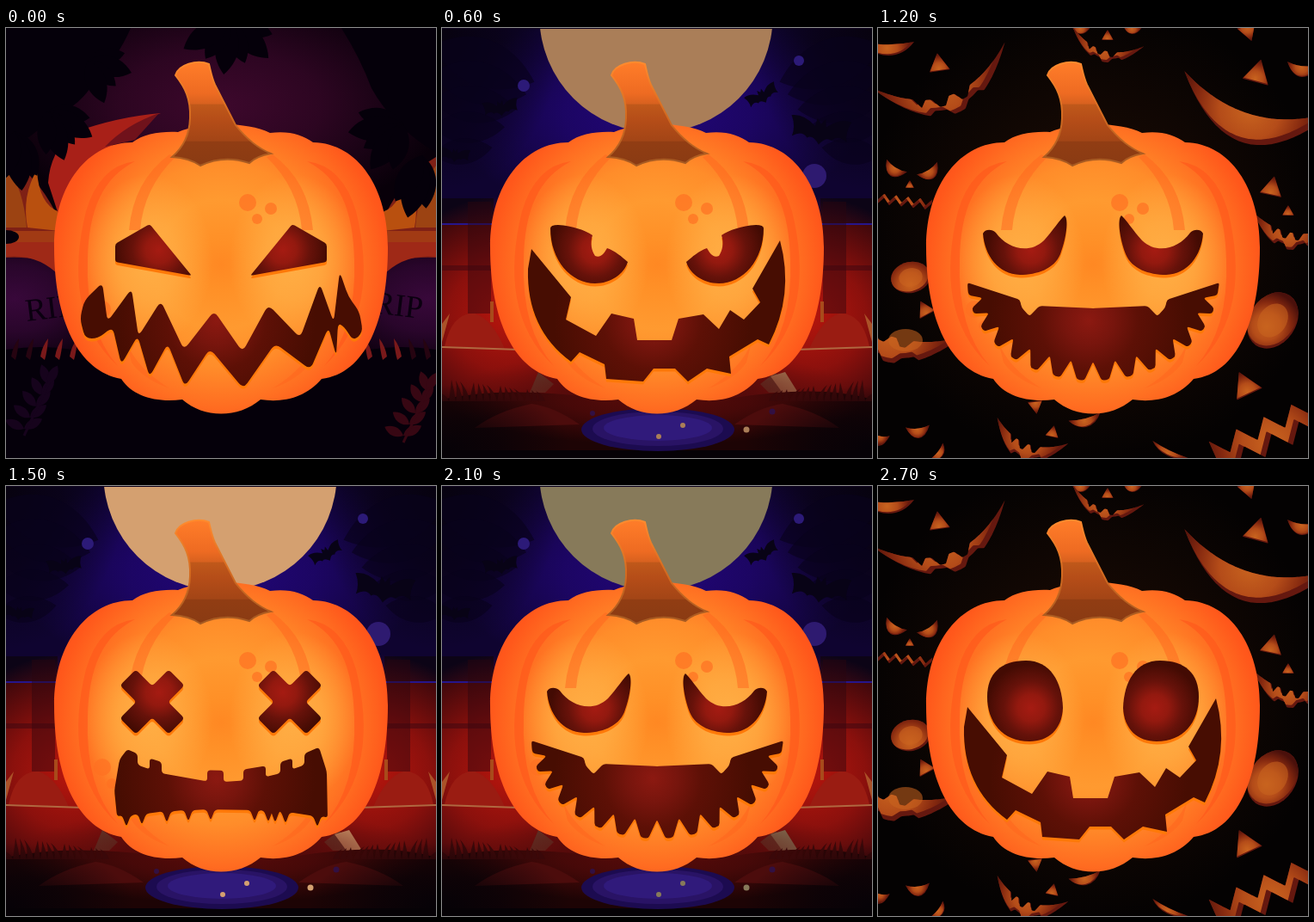
Recreate the animation shown at these times as an HTML page with a canvas. Size 500x500 px, loop 3000 ms.

```html
<!DOCTYPE html>
<html lang="en">
<head>
<meta charset="utf-8">
<title>Pumpkin faces</title>
<style>
html, body { margin: 0; width: 100%; height: 100%; overflow: hidden; background: #000; }
canvas { display: block; width: 100vw; height: 100vh; }
</style>
</head>
<body>
<canvas id="stage" width="500" height="500"></canvas>
<script>
const c = document.getElementById('stage').getContext('2d');
const STEP = 300;

const fill = (path, color) => { c.fillStyle = color; c.fill(path); };
const shape = (d, color) => fill(new Path2D(d), color);
const rect = (x, y, w, h, color) => { c.fillStyle = color; c.fillRect(x, y, w, h); };

function line(d, color, w) {
  c.strokeStyle = color;
  c.lineWidth = w;
  c.stroke(new Path2D(d));
}

function oval(x, y, rx, ry, color) {
  c.beginPath();
  c.ellipse(x, y, rx, ry, 0, 0, 7);
  c.fillStyle = color;
  c.fill();
}
const dot = (x, y, r, color) => oval(x, y, r, r, color);

function ramp(g, stops) {
  for (const [at, color] of stops) g.addColorStop(at, color);
  return g;
}
const radial = (x, y, r, ...stops) => ramp(c.createRadialGradient(x, y, 0, x, y, r), stops);
const linear = (y0, y1, ...stops) => ramp(c.createLinearGradient(0, y0, 0, y1), stops);

function at(x, y, turn, draw) {
  c.save();
  c.translate(x, y);
  c.rotate(turn);
  draw();
  c.restore();
}

function glow(x, y, rx, ry, color) {
  at(x, y, 0, () => {
    c.scale(rx, ry);
    dot(0, 0, 1, radial(0, 0, 1, [0, color], [.45, color + 'b0'], [1, color + '00']));
  });
}

function mirror(draw) {
  draw();
  c.save();
  c.translate(500, 0);
  c.scale(-1, 1);
  draw();
  c.restore();
}

// Closed polygon with softened corners
function poly(pts, soft = 2) {
  const path = new Path2D();
  const toward = ([x, y], [u, v]) => {
    const len = Math.hypot(u - x, v - y) || 1, k = Math.min(soft / len, .5);
    return [x + (u - x) * k, y + (v - y) * k];
  };
  pts.forEach((p, i) => {
    const a = toward(p, pts[(i || pts.length) - 1]), b = toward(p, pts[(i + 1) % pts.length]);
    i ? path.lineTo(...a) : path.moveTo(...a);
    path.quadraticCurveTo(...p, ...b);
  });
  path.closePath();
  return path;
}

// Height of a smiling curve whose lowest point is y
const smile = (x, y, bend) => y - bend * (x - 250) ** 2;

function zigzagMouth() {
  const top = [118, 146, 154, 180, 207, 242, 275, 305, 342, 365, 381, 388];
  const bottom = [386, 384, 375, 354, 313, 276, 237, 208, 188, 167, 153, 134, 124];
  return poly([
    [86, 338], [91, 317], [112, 296],
    ...top.map((x, i) => [x, i % 2 ? smile(x, 329, .0024) : smile(x, 378, .0021)]),
    [398, 312], [411, 330], [415, 354], [404, 364], [393, 347],
    ...bottom.map((x, i) => [x, i % 2 ? smile(x, 421, .0022) : smile(x, 373, .0016)]),
    [107, 361], [92, 361]
  ], 8);
}

function deadMouth() {
  const steps = [141, 153, 167, 181, 234, 253, 276, 302, 319, 333, 347, 364];
  const drips = [362, 325, 313, 305, 289, 238, 212, 187, 158, 140];
  const pts = [];
  steps.slice(1).forEach((x, i) => {
    for (const edge of [steps[i], x]) pts.push([edge, smile(edge, 331, .0021) + i % 2 * 13]);
  });
  pts.push([373, 332], [374, 386]);
  for (const x of drips) {
    const y = smile(x, 376, -.0006);
    pts.push([x + 5, y], [x, y + 13], [x - 5, y]);
  }
  return poly([...pts, [129, 384], [126, 354], [132, 318]], 4);
}

function sawMouth() {
  const half = [[104, 296], [165, 316], [167, 325], [176, 335], [188, 323]];
  const pts = [...half, [250, 326], ...half.map(([x, y]) => [501 - x, y]).reverse()];
  const add = (a, rx, ry) => pts.push([250 + rx * Math.cos(a), 296 + ry * Math.sin(a)]);
  const n = 16, gap = Math.PI / n;
  for (let i = 0; i < n; i++) {
    const a = (i + .5) * gap;
    add(a - gap * .15, 146, 114);
    add(a + gap * .15, 146, 114);
    if (i < n - 1) add(a + gap * .5, 131, 92);
  }
  return poly(pts, 3);
}

function crossEye() {
  const pts = [];
  for (let i = 0; i < 4; i++) {
    const a = Math.PI * (i / 2 + .25), cos = Math.cos(a), sin = Math.sin(a);
    for (const [u, v] of [[40, -13], [40, 13], [13, 13]]) pts.push([170 + u * cos - v * sin, 251 + u * sin + v * cos]);
  }
  return poly(pts, 4);
}

const EYES = {
  wedge: poly([[127, 251], [167, 228], [216, 288], [127, 272]], 3),
  sly: new Path2D('M126 233Q126 229 135 229C152 230 166 235 175 241C172 250 174 259 178 265C185 268 189 261 192 256C201 259 209 266 216 272C212 286 196 297 178 297C150 297 126 270 126 233Z'),
  round: new Path2D('M127 245C127 218 143 203 172 203C200 203 214 227 215 258C214 283 198 297 176 297C145 297 127 275 127 245Z'),
  cross: crossEye(),
  droop: new Path2D('M122 239C124 234 132 233 137 238C150 256 175 264 193 247C203 236 212 222 217 218C222 222 219 245 212 263C205 280 185 287 165 287C140 286 124 265 122 239Z')
};

const MOUTHS = {
  zigzag: zigzagMouth(),
  jagged: new Path2D('M104 257L150 313 144 339 179 358 197 332 223 338 227 363H267L275 338 304 333 322 350 335 328 351 339 370 319 361 303 393 247Q410 310 380 368L367 362 334 382 336 402 308 396 286 411 271 396H246L234 411 191 408 189 391 160 377 150 388Q98 350 100 280Z'),
  dead: deadMouth(),
  saw: sawMouth(),
  friendly: new Path2D('M114 303C140 318 165 328 190 330C188 340 190 349 198 349C208 349 214 342 215 333Q250 334 285 331C287 341 291 347 299 347C308 347 311 338 309 326C335 322 365 313 385 301C388 345 355 395 267 405C267 390 262 380 250 380C239 380 234 390 234 403C165 398 115 350 114 303Z')
};

function leaf(x, y, len, turn, color) {
  at(x, y, turn, () =>
    shape(`M0 0C${len * .3} ${-len * .32} ${len * .7} ${-len * .28} ${len} 0C${len * .7} ${len * .28} ${len * .3} ${len * .3} 0 0Z`, color));
}

function fan(x, y, n, from, to, len, color) {
  for (let i = 0; i < n; i++) leaf(x, y, len * (1 + i % 2 * .2), from + (to - from) * i / (n - 1), color);
}

function bush(x, y, color) {
  for (let i = 0; i < 5; i++) {
    const px = x + i * 7 - 14, py = y - i * 13 + 30;
    leaf(px, py, 24, -2.7 + i * .2, color);
    leaf(px, py, 24, -.5 - i * .15, color);
  }
  line(`M${x - 14} ${y + 38}L${x + 16} ${y - 26}`, color, 3);
}

function graveyard() {
  const ink = '#05000a';
  rect(0, 0, 500, 500, '#080009');
  glow(250, 90, 260, 140, '#3d082c');
  mirror(() => {
    glow(10, 315, 130, 85, '#38083a');
    shape('M0 150Q35 170 58 215L68 280Q40 265 0 267Z', '#7f2015');
    shape('M0 160Q20 185 24 232L0 232Z', '#9c4312');
    shape('M25 232Q18 195 36 165Q38 205 62 214L62 236Z', '#b9500f');
    rect(0, 236, 64, 13, '#a13a14');
    shape('M0 249H64V290Q38 262 0 266Z', '#9f2917');
  });
  shape('M180 99Q130 103 77 122Q51 145 49 180L62 220 120 140Q148 110 180 99Z', '#a82018');
  shape('M178 99Q140 112 115 138L150 130Z', '#70121b');
  c.font = '37px "Liberation Serif", serif';
  c.fillStyle = '#0b0010';
  at(24, 341, -.12, () => c.fillText('RIP', 0, 0));
  at(426, 331, .12, () => c.fillText('RIP', 0, 0));
  shape('M0 374Q60 365 110 382H390Q440 365 500 374V500H0Z', ink);
  mirror(() => {
    for (let x = 6; x < 75; x += 17) shape(`M${x} 382Q${x + 2} 370 ${x + 9} 361Q${x + 8} 376 ${x + 5} 386Z`, x > 30 ? '#79191a' : '#260411');
  });
  shape('M0 0H145Q130 35 104 60Q88 90 54 104Q30 128 0 142Z', ink);
  shape('M500 0H390Q412 35 425 70Q450 115 500 145Z', ink);
  fan(48, 97, 5, .15, 1.6, 50, ink);
  fan(10, 120, 3, 1.1, 1.8, 58, ink);
  fan(462, 112, 5, 3.4, 1.8, 54, ink);
  fan(484, 148, 3, 1.5, 2.1, 62, ink);
  fan(95, 38, 4, -.2, 1.2, 44, ink);
  fan(260, -8, 6, .3, 2.6, 52, ink);
  oval(0, 243, 15, 8, ink);
  bush(35, 436, '#16031c');
  bush(476, 444, '#370713');
}

function bat(x, y, size, turn) {
  at(x, y, turn, () => {
    c.scale(size, size);
    shape('M-22 -8Q-13 -10 -4 -2L-3 -8 0 -4 3 -8 4 -2Q13 -10 22 -8Q18 0 20 7Q13 2 9 7Q5 4 0 11Q-5 4 -9 7Q-13 2 -20 7Q-18 0 -22 -8Z', '#080316');
  });
}

function moonlight(moon) {
  rect(0, 0, 500, 500, '#0a0410');
  rect(0, 0, 500, 232, '#0f0430');
  glow(250, 100, 240, 130, '#22067a');
  mirror(() => {
    glow(0, 0, 140, 190, '#07020f');
    for (let i = 0; i < 5; i++) leaf(-10, 20 + i * 32, 125 - i * 14, .35 - i * .12, '#09031ca0');
    rect(0, 198, 60, 30, '#0c0416');
  });
  dot(249, -14, 135.7, moon);
  rect(0, 0, 500, 1, '#10051f');
  dot(95, 67, 7, '#2c1a78');
  dot(415, 38, 6, '#2c1a78');
  dot(433, 172, 14, '#2e1a70');
  bat(68, 92, .95, -.15);
  bat(372, 78, .9, -.5);
  bat(440, 118, 1.6, .12);
  bat(15, 147, .8, .1);
  rect(0, 228, 500, 210, '#2e060b');
  mirror(() => {
    glow(75, 335, 150, 140, '#b5150d');
    rect(0, 227, 62, 2, '#26158c');
    rect(30, 202, 27, 130, '#29060f70');
    rect(0, 276, 60, 6, '#3b071080');
    shape('M3 370Q12 330 38 332Q58 338 73 373Z', '#9a1c12');
    shape('M0 344L9 332 0 365Z', '#ab5228');
    rect(56, 318, 4, 24, '#a84b1b');
    line('M0 371L90 374', '#b06840', 2);
    shape('M102 424L112 400 130 414 120 424Z', '#623c2d');
  });
  shape('M382 405L399 400 414 424 398 427Z', moon);
  shape('M0 432Q70 416 180 430H340Q440 414 500 432V500H0Z', '#1d0405');
  glow(250, 430, 245, 55, '#590b0a');
  mirror(() => {
    for (let x = 0; x < 120; x += 8) {
      const h = 6 + x * 13 % 15;
      shape(`M${x} 434Q${x + 2} ${430 - h / 2} ${x - 5 + x % 11} ${429 - h}Q${x + 6} ${430 - h / 2} ${x + 8} 434Z`, '#3a0809');
    }
    shape('M38 465Q65 445 104 437Q130 440 160 461Z', '#4c0c0c');
    glow(0, 490, 150, 75, '#060207');
  });
  rect(0, 491, 500, 9, '#060206');
  for (let i = 0; i < 3; i++) oval(251, 467 - i, 89 - i * 13, 25 - i * 5, ['#1c0b50', '#291365', '#301a7b'][i]);
  dot(175, 448, 3, '#321042');
  dot(384, 446, 3.5, '#321042');
  dot(280, 462, 3, moon);
  dot(252, 475, 3, moon);
  dot(354, 467, 3.5, moon);
}

// Cut-out with a dark thickness and a lit inner wall
function lantern(path, size) {
  fill(path, '#65180f');
  c.save();
  c.clip(path);
  c.translate(-size * .05, -size * .06);
  fill(path, radial(0, size * .3, size, [0, '#c9641f'], [.4, '#b44c19'], [.7, '#84280f'], [1, '#4a100b']));
  c.restore();
}

const tri = (x, y, r, turn) => at(x, y, turn, () =>
  lantern(poly([0, 1, 2].map(i => [r * Math.sin(i * 2.1), -r * Math.cos(i * 2.1)]), 1), r * 1.3));

const slit = (x, y, w, h, turn) => at(x, y, turn, () =>
  lantern(new Path2D(`M${-w} 0Q0 ${h * .4} ${w} 0Q${w * .6} ${h} 0 ${h}Q${-w * .6} ${h} ${-w} 0Z`), w));

function hollow(x, y, rx, ry, turn) {
  at(x, y, turn, () => {
    const p = new Path2D();
    p.ellipse(0, 0, rx, ry, 0, 0, 7);
    lantern(p, rx * 1.5);
    oval(0, 0, rx * .6, ry * .6, '#c9641f90');
  });
}

function grin(x, y, w, top, depth, turn, teeth) {
  const pts = [], n = 24, bow = i => 1 - (i / n * 2 - 1) ** 2;
  for (let i = 0; i <= n; i++) {
    const bite = teeth && i > 6 && i < 18 && Math.floor(i / 2) % 2;
    pts.push([w * (i / n * 2 - 1), top * bow(i) + (bite ? teeth : 0)]);
  }
  for (let i = n - 1; i > 0; i--) {
    const bite = teeth && i > 5 && i < 19 && Math.floor(i / 3) % 2;
    pts.push([w * (i / n * 2 - 1), depth * bow(i) - (bite ? teeth * .7 : 0)]);
  }
  at(x, y, turn, () => lantern(poly(pts, 1), w));
}

function zigzag(x, y, len, n, high, thick, turn) {
  const edge = [...Array(n + 1).keys()].map(i => [(i / n - .5) * len, i % 2 ? high : -high]);
  at(x, y, turn, () => lantern(poly([...edge, ...edge.map(([u, v]) => [u, v + thick]).reverse()], 1), len * .6));
}

function lanterns() {
  rect(0, 0, 500, 500, '#040202');
  glow(250, 240, 270, 270, '#1b0b04');
  // Upper row
  tri(71, 43, 14, -.15);
  slit(12, 16, 30, 16, 0);
  grin(70, 43, 82, 38, 60, -.33, 10);
  tri(267, 10, 8, 0);
  slit(296, -2, 11, 9, .1);
  slit(236, -2, 11, 9, .1);
  grin(268, 10, 43, 17, 30, .26, 6);
  tri(441, 54, 18, .25);
  tri(430, 3, 13, 2.8);
  slit(494, 41, 18, 16, .1);
  grin(443, 74, 90, 28, 62, .27, 0);
  // Sides
  slit(22, 160, 14, 14, .55);
  slit(57, 163, 14, 14, -.55);
  tri(37, 183, 6, 0);
  zigzag(28, 199, 70, 10, 4, 5, .12);
  hollow(38, 290, 23, 18, -.2);
  tri(55, 328, 12, -.5);
  grin(24, 334, 78, 26, 56, .33, 9);
  oval(32, 363, 20, 13, '#c9641f90');
  tri(458, 187, 15, .2);
  tri(477, 214, 8, 0);
  grin(482, 224, 46, 14, 34, .2, 8);
  hollow(459, 340, 27, 35, .6);
  // Lower row
  tri(428, 417, 19, -.45);
  zigzag(453, 462, 140, 8, 11, 22, -.42);
  tri(183, 439, 10, 3);
  slit(240, 452, 19, 12, -.25);
  tri(203, 471, 9, .2);
  grin(180, 468, 44, 17, 38, .35, 8);
  slit(46, 463, 14, 14, -.1);
  slit(3, 472, 11, 14, .2);
  slit(68, 492, 12, 9, -.9);
  slit(340, 490, 23, 8, .45);
}

const BODY = new Path2D('M147 133C160 123 180 120 200 121C230 109 280 109 307 122C328 119 345 124 357 133C410 134 444 187 444 255C444 340 418 402 367 408C348 430 322 436 296 432C270 454 230 454 205 432C174 436 147 428 134 408C84 399 56 340 56 255C56 180 97 133 147 133Z');
const STEM = new Path2D('M197 55C200 43 222 36 236 42C238 50 239 57 243 66L267 113Q286 137 308 146Q291 149 283 157Q253 147 226 160Q213 151 193 150Q213 133 214 105C215 82 208 69 197 55Z');

function pumpkin() {
  fill(BODY, radial(250, 275, 215, [0, '#ff8823'], [.13, '#ff9027'], [.35, '#ff9a30'], [.55, '#ff8d2a'], [.75, '#ff7022'], [.9, '#ff581b'], [1, '#ff4f1a']));
  c.save();
  c.clip(BODY);
  mirror(() => {
    glow(165, 270, 75, 100, '#ffae45');
    shape('M150 155Q109 160 93 213C75 286 83 350 130 393Q92 350 95 270C96 210 113 174 150 155Z', '#ff591cb0');
    shape('M190 147Q148 178 143 235L156 235Q160 186 197 150Z', '#ff661f80');
    shape('M140 365Q151 395 190 419Q159 408 146 389Z', '#ff681fa0');
    c.globalAlpha = 1;
  });
  const freckle = '#ff7022b0';
  dot(281, 203, 10, freckle);
  dot(308, 210, 7, freckle);
  dot(292, 222, 6, freckle);
  dot(112, 327, 10, freckle);
  dot(123, 346, 6, freckle);
  c.restore();
  fill(STEM, linear(40, 160, [0, '#ff7d29'], [.3, '#ee6b22'], [.4, '#d8611f'], [.41, '#bf581a'], [.56, '#b54d18'], [.76, '#a34516'], [.77, '#913d13'], [1, '#8a3b13']));
  c.strokeStyle = linear(40, 160, [0, '#ff8b2e'], [.5, '#d46b20'], [1, '#a55a22']);
  c.lineWidth = 2;
  c.stroke(STEM);
}

function carve(path, paint) {
  at(0, 3.5, 0, () => fill(path, '#ff7908'));
  fill(path, paint);
}

function face(eyes, mouth) {
  const eyeY = eyes === 'cross' ? 240 : 258;
  mirror(() => carve(EYES[eyes], radial(178, eyeY, 52, [0, '#a51b12'], [.3, '#93190f'], [.6, '#67120a'], [1, '#430b03'])));
  carve(MOUTHS[mouth], radial(245, 340, 115, [0, '#8c1911'], [.25, '#77150d'], [.5, '#5d1006'], [1, '#470d02']));
}

const SCENES = [
  [graveyard, 'wedge', 'zigzag'],
  [graveyard, 'sly', 'friendly'],
  [moonlight, 'sly', 'jagged', '#aa7e58'],
  [lanterns, 'round', 'zigzag'],
  [lanterns, 'droop', 'saw'],
  [moonlight, 'cross', 'dead', '#d4a070'],
  [moonlight, 'wedge', 'jagged', '#aa7e58'],
  [moonlight, 'droop', 'saw', '#877a5a'],
  [graveyard, 'round', 'friendly'],
  [lanterns, 'round', 'jagged']
];

let shown = -1;
function frame() {
  const i = Math.floor(performance.now() / STEP) % SCENES.length;
  if (i !== shown) {
    const [backdrop, eyes, mouth, moon] = SCENES[i];
    backdrop(moon);
    pumpkin();
    face(eyes, mouth);
    shown = i;
  }
  requestAnimationFrame(frame);
}
frame();
</script>
</body>
</html>
```
